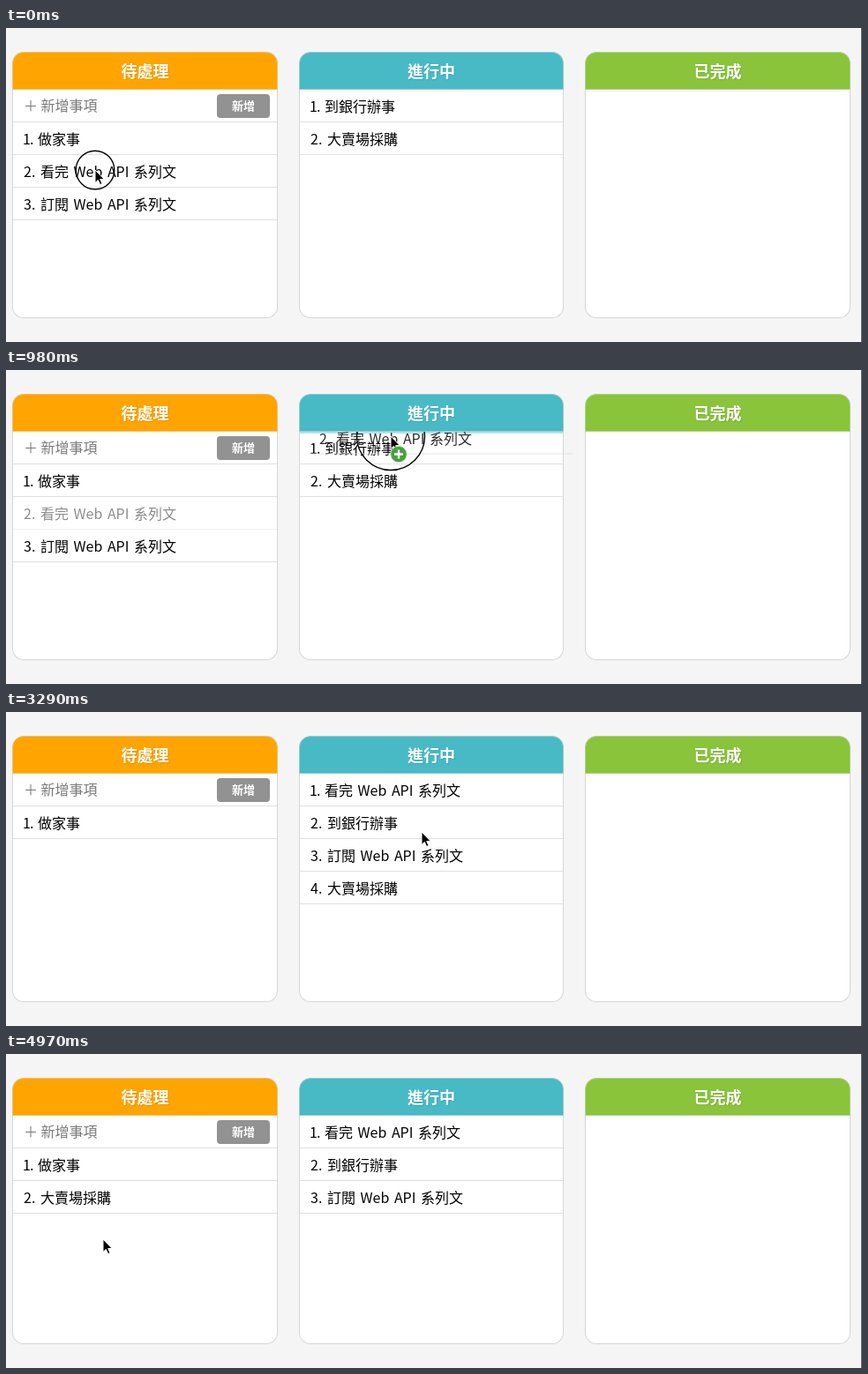
Recreate the animation shown at these times as an HTML page. Size 970x356 px, loop 5040 ms.

```html
<!DOCTYPE html>
<html lang="zh-Hant">
<head>
<meta charset="utf-8">
<title>待辦看板</title>
<style>
* { box-sizing: border-box; }
html, body { margin: 0; width: 100%; height: 100%; overflow: hidden; }
body {
  position: relative;
  background: #f5f5f5;
  color: #000;
  font: 16px/36px "Noto Sans CJK TC", "Noto Sans CJK", sans-serif;
  white-space: nowrap;
}
.edge { position: absolute; right: 0; top: 0; width: 1px; height: 100%; background: #555; }
.column {
  position: absolute; left: var(--x); top: 27px; width: var(--w); height: 302px;
  padding: 0 1px; border-radius: 13px; overflow: hidden;
  background: #fff; box-shadow: inset 0 0 0 1px #d6d6d6;
}
h2 {
  position: relative; z-index: 1; margin: 0 -1px; height: 43px;
  border: 1px solid color-mix(in srgb, var(--tone), #ddd);
  border-radius: 13px 13px 0 0; background: var(--tone);
  color: #fff; font-size: 18px; line-height: 41px; text-align: center;
  text-shadow: 1px 1px 1px rgba(0, 0, 0, .1);
}
ul { margin: 0; padding: 0; list-style: none; }
.row {
  position: relative; height: 37px; padding-left: 12px;
  border-bottom: 1px solid #e0e0e0; word-spacing: 2px; overflow: hidden;
}
.row.held { opacity: .45; }
.one { margin-left: -1px; letter-spacing: -1px; }
.wash {
  position: absolute; z-index: -1; top: 1px; width: 299px; height: 34px;
  border-radius: 17px; background: #e6f3fc;
}
.entry { color: #7b7b7b; word-spacing: 0; line-height: 35px; }
.entry b {
  position: absolute; right: 8px; top: 5px; width: 60px; height: 27px;
  border-radius: 4px; background: #929292;
  color: #fff; font-size: 13px; line-height: 26px; text-align: center;
}
#slot { position: absolute; left: 1px; right: 1px; height: 4px; background: #b9dfe6; }
#ghost { position: absolute; left: 0; top: 0; width: 299px; opacity: .82; }
#pointer { position: absolute; left: 0; top: 0; overflow: visible; }
</style>
</head>
<body>
<section class="column" style="--x:7px;--w:301px;--tone:#ffa400">
  <h2>待處理</h2>
  <div class="row entry">＋ 新增事項<b>新增</b></div>
  <ul id="todo"></ul>
</section>
<section class="column" style="--x:332px;--w:300px;--tone:#47bac6">
  <h2>進行中</h2>
  <ul id="doing"></ul>
  <div id="slot"></div>
</section>
<section class="column" style="--x:656px;--w:301px;--tone:#89c43b">
  <h2>已完成</h2>
</section>
<div class="edge"></div>
<div id="ghost" class="row"></div>
<svg id="pointer" width="1" height="1">
  <circle id="ring" fill="none" stroke="#000" stroke-width="1.4"/>
  <path d="M0 0V14.5L3.3 11.4L5.6 16.6L8 15.6L5.7 10.5H10.2Z" stroke="#fff" stroke-linejoin="round"/>
  <g id="badge" transform="translate(9 20.5)">
    <circle r="9.2" fill="#46a23b" stroke="#cfdccb"/>
    <path d="M-5 0H5M0-5V5" stroke="#fff" stroke-width="2.4"/>
  </g>
</svg>
<script>
const LOOP = 5040, STEP = 70, ROW = 37, HEADER = 43;
const $ = id => document.getElementById(id);
const show = (el, on) => { el.style.display = on ? '' : 'none'; };
const ease = k => k * k * (3 - 2 * k);

const start = {
  todo: ['做家事', '看完 Web API 系列文', '訂閱 Web API 系列文'],
  doing: ['到銀行辦事', '大賣場採購']
};
const origin = { todo: { x: 8, y: 107 }, doing: { x: 333, y: 70 } };

// Each drag takes row `pick` of one list to row `put` of the other.
const drags = [
  { press: 0, lift: 140, drop: 1610, release: 1750, from: 'todo', pick: 1, to: 'doing', put: 0, grab: { x: 101, y: 160.5 } },
  { press: 2170, lift: 2310, drop: 3150, release: 3220, from: 'todo', pick: 1, to: 'doing', put: 2, grab: { x: 159, y: 160.5 } },
  { press: 4060, lift: 4270, drop: 4830, release: 4900, from: 'doing', pick: 3, to: 'todo', put: 1, grab: { x: 397, y: 207.5 } }
];

// Pointer moves; `lag` makes the vertical part set in later.
const moves = [
  { at: 70, time: 475, x: 436, y: 75, lag: 3.4 },
  { at: 1190, time: 490, x: 456, y: 64 },
  { at: 1750, time: 350, x: 148, y: 162 },
  { at: 2240, time: 250, x: 471, y: 136 },
  { at: 3430, time: 490, x: 397, y: 209 },
  { at: 4200, time: 210, x: 110, y: 210 }
];

function pointerAt(t) {
  let x = 101, y = 161;
  for (const m of moves) {
    const s = ease(Math.min(1, Math.max(0, (t - m.at) / m.time)));
    x += (m.x - x) * s;
    y += (m.y - y) * s ** (m.lag || 1);
  }
  return { x, y };
}

function listsAt(t) {
  const lists = { todo: [...start.todo], doing: [...start.doing] };
  for (const d of drags.filter(d => d.drop <= t)) {
    lists[d.to].splice(d.put, 0, ...lists[d.from].splice(d.pick, 1));
  }
  return lists;
}

const overList = x => x > 8 && x < 632 && (x - 8) % 325 < 299;
const label = (item, i) => (i ? `${i + 1}.` : '<span class="one">1.</span>') + ' ' + item;

function drawLists(lists, drag) {
  for (const name in lists) {
    const html = lists[name].map((item, i) => {
      const held = drag && drag.from === name && drag.pick === i;
      return `<li class="row${held ? ' held' : ''}">${held ? '<i class="wash"></i>' : ''}${label(item, i)}</li>`;
    });
    $(name).innerHTML = html.join('');
  }
}

function render(t) {
  const { x, y } = pointerAt(t);
  const lists = listsAt(t);
  const press = drags.find(d => t >= d.press && t < d.release);
  const lifted = press && t >= press.lift;
  const drag = lifted && t < press.drop ? press : null;
  const copying = lifted && overList(x);

  drawLists(lists, drag);
  show($('ghost'), drag);
  show($('slot'), drag && drag.to === 'doing' && x > origin.doing.x);
  if (drag) {
    const { from, pick, put, grab } = drag;
    const dx = x - grab.x, dy = y - grab.y;
    const left = origin[from].x + dx, top = origin[from].y + ROW * pick + dy;
    $('ghost').innerHTML = label(lists[from][pick], pick);
    $('ghost').style.transform = `translate(${left}px, ${top}px)`;
    document.querySelector('.wash').style.left = dx + 'px';
    $('slot').style.top = HEADER + ROW * put - 2 + 'px';
  }

  $('pointer').style.transform = `translate(${x}px, ${y}px)`;
  show($('ring'), press);
  show($('badge'), copying);
  $('ring').setAttribute('r', copying ? 38.5 : 21.8);
}

const begin = performance.now();
let shown = -1;
function tick() {
  const t = Math.floor((performance.now() - begin) % LOOP / STEP) * STEP;
  if (t !== shown) render(shown = t);
  requestAnimationFrame(tick);
}
tick();
</script>
</body>
</html>
```
